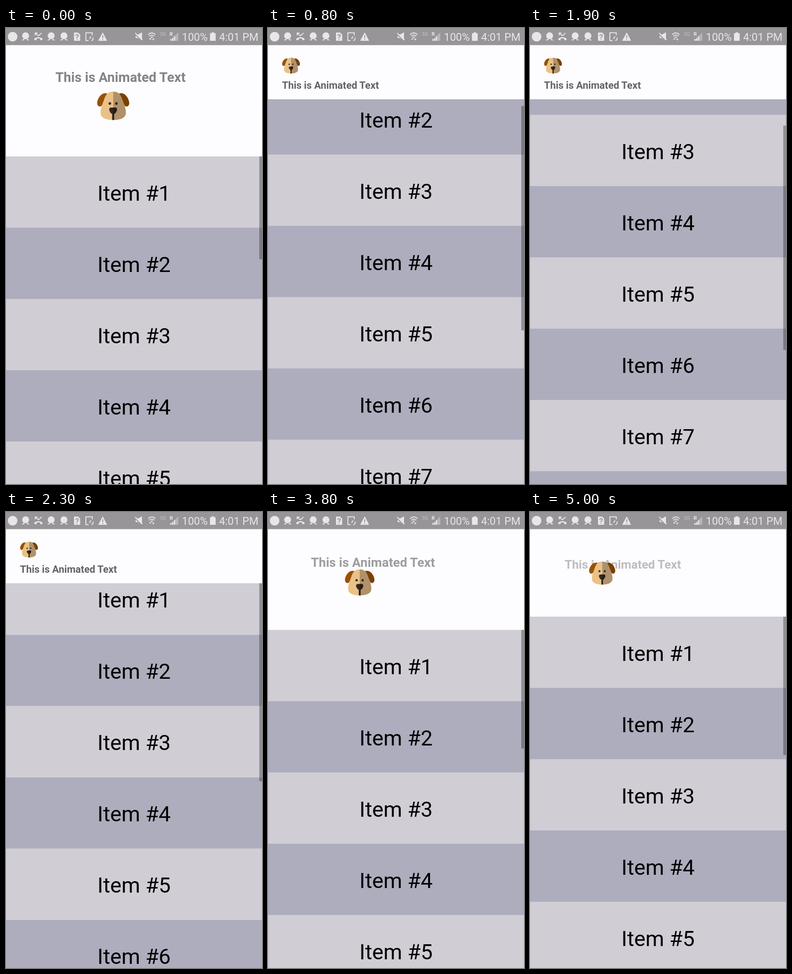
Write an HTML page that moves like this. It is 561x998 px and loops after 5.1 s.

```html
<!DOCTYPE html>
<html lang="en">
<head>
<meta charset="utf-8">
<title>Collapsing header</title>
<style>
  html, body { margin: 0; width: 100%; height: 100%; overflow: hidden; background: #fdfcfe; }
  svg { display: block; width: 561px; height: 998px; }
  text { font-family: Roboto, sans-serif; }
  .item text { font-size: 46.8px; text-anchor: middle; fill: #000; }
  #title { font-weight: 700; fill: #636265; }
  #status { fill: #e8e6e8; }
  #status .line { fill: none; stroke: #e8e6e8; stroke-width: 2; }
  #status .cut { fill: none; stroke: #989598; stroke-width: 2; }
  #status text { font-size: 23.4px; }
  #status .tiny { font-size: 11px; }
</style>
</head>
<body>
<svg viewBox="0 0 561 998">
  <defs>
    <g id="ring">
      <circle class="line" cy="17" r="7.6"/>
      <path class="line" d="M-9 27H-3V23M9 27H3V23"/>
    </g>
    <path id="ear" d="M22 4C10 1 0 17 0 27C0 36 8 37 11 33C15 26 17 14 25 5Z"/>
    <path id="face" d="M38 0C26 0 20 6 16 20C12 32 8 38 8 50C8 62 20 67 38 67Z"/>
  </defs>

  <g id="list"></g>
  <rect id="bar" x="555" width="6" fill="#000" fill-opacity=".3"/>
  <rect id="header" width="561" fill="#fdfcfe"/>
  <text id="title">This is Animated Text</text>

  <g id="dog">
    <use href="#ear" fill="#985200"/>
    <use href="#ear" fill="#794100" transform="translate(76) scale(-1 1)"/>
    <use href="#face" fill="#eac186"/>
    <use href="#face" fill="#b09169" transform="translate(76) scale(-1 1)"/>
    <circle cx="30" cy="28" r="3.1" fill="#3c302c"/>
    <circle cx="45.5" cy="28" r="3.1" fill="#342a28"/>
    <path d="M28.5 43Q28 37.5 34 37.5H42Q47.500 37.500 47 43Q45.500 50 40 53V67H35.500V53Q30 50 28.500 43Z" fill="#35271f"/>
    <path d="M38 37.500H42Q47.500 37.500 47 43Q45.500 50 40 53V67H38Z" fill="#281d18"/>
  </g>

  <g id="status">
    <rect width="561" height="37.500" fill="#989598"/>
    <circle cx="14.500" cy="19" r="10.500"/>
    <use href="#ring" x="43"/>
    <use href="#ring" x="99"/>
    <use href="#ring" x="127"/>
    <path class="line" d="M64 11L71 17L78 11M64 16V11H69"/>
    <path d="M62 26V23Q71 17 80 23V26L75 27V23.500Q71 22 67 23.500V27Z"/>
    <path d="M149 10H158L162.500 14.500V28H149Z"/>
    <path class="cut" d="M153 17Q153 14.500 155.700 14.500T158.500 17Q158.500 18.500 155.700 20V22M155.700 23.500V25.500"/>
    <path class="line" d="M189 16V10.500H175V27.500H181"/>
    <path class="line" stroke-width="1.500" d="M184 24A4.500 4.500 0 0 1 187 19M190.500 21A4.500 4.500 0 0 1 187 27.500"/>
    <path d="M212 9.500L221.500 28H202Z"/>
    <path class="cut" d="M212 16V22M212 24V26"/>
    <path d="M284 15H288L298 9.500V27.500L288 22H284Z"/>
    <path class="cut" d="M282 13L297 28"/>
    <path class="line" d="M283 11L299 26"/>
    <path class="line" d="M311.500 14.500Q319.500 7 327.500 14.500M314 18Q319.500 13 325 18"/>
    <path d="M316.500 20Q319.500 17.500 322.500 20L319.500 22ZM313.500 25H319L316.200 21.500ZM320 23.500H325.500L322.700 27.500Z"/>
    <text class="tiny" x="337" y="17" opacity=".55">3G</text>
    <text class="tiny" x="358.500" y="17" font-weight="700">R</text>
    <path opacity=".4" d="M377.500 9.500V28H360Z"/>
    <path d="M360 24H362.500V28H360ZM364 22H366.500V28H364ZM368 18H370.500V28H368Z"/>
    <text x="385.500" y="28">100%</text>
    <path d="M447 11.500H450.500V9.500H456V11.500H459.500V28H447Z"/>
    <text x="467" y="28">4:01 PM</text>
  </g>
</svg>

<script>
const LOOP = 5100, STEP = 100;
const ITEM = 156, OPEN = 312, CLOSED = 156;
const $ = id => document.getElementById(id);

// Top of the first row: [step, y]
const keys = [
  [0, 281], [1, 289], [2, 262], [5, 121], [8, -35], [12, -163], [14, -175],
  [16, -175], [17, -165], [19, -122], [22, 60], [25, 205], [28, 304], [29, 312],
  [32, 248], [35, 312], [38, 258], [40, 210], [44, 118], [46, 118], [48, 152],
  [50, 229], [51, 281]
];

const slope = i => (keys[i + 1][1] - keys[i][1]) / (keys[i + 1][0] - keys[i][0]);

// Monotone tangent, so that turning points never overshoot
function tangent(i) {
  if (i === 0 || i === keys.length - 1) return 0;
  const a = slope(i - 1), b = slope(i);
  return a * b > 0 ? 2 * a * b / (a + b) : 0;
}

function rowTop(step) {
  let i = 0;
  while (step >= keys[i + 1][0]) i++;
  const [t0, y0] = keys[i], [t1, y1] = keys[i + 1];
  const d = t1 - t0, u = (step - t0) / d, v = 1 - u;
  return v * v * (1 + 2 * u) * y0 + u * u * (3 - 2 * u) * y1
    + d * u * v * (v * tangent(i) - u * tangent(i + 1));
}

function set(node, attrs) {
  for (const name in attrs) node.setAttribute(name, attrs[name]);
}

$('list').innerHTML = Array.from({ length: 9 }, (_, i) => `
  <g class="item" transform="translate(0 ${i * ITEM})">
    <rect width="561" height="${ITEM}" fill="${i % 2 ? '#aeadbd' : '#d0cdd5'}"/>
    <text x="280.5" y="96.7">Item #${i + 1}</text>
  </g>`).join('');

function draw(step) {
  const y = rowTop(step);
  const height = Math.max(CLOSED, y);
  const p = (OPEN - height) / (OPEN - CLOSED);
  const lerp = (a, b) => a + (b - a) * p;

  set($('list'), { transform: `translate(0 ${y})` });
  set($('header'), { height });

  const barEnd = 495 + (304 - y) * 0.492;
  const barTop = Math.max(height, barEnd - 491);
  set($('bar'), { y: barTop, height: barEnd - barTop });

  set($('title'), {
    x: lerp(127.5, 30.7),
    y: lerp(114, 132.5),
    'font-size': lerp(31.17, 21.82),
    opacity: p < 0.9 ? 1 - p / 0.9 : (p - 0.9) / 0.1
  });
  set($('dog'), {
    transform: `translate(${lerp(241.7, 31)} ${lerp(157.7, 65)}) scale(${lerp(78, 39) / 76})`
  });
}

let shown = -1;
const start = performance.now();
function tick(now) {
  const step = Math.floor(Math.max(0, now - start) % LOOP / STEP);
  if (step !== shown) draw(shown = step);
  requestAnimationFrame(tick);
}
draw(0);
requestAnimationFrame(tick);
</script>
</body>
</html>
```
